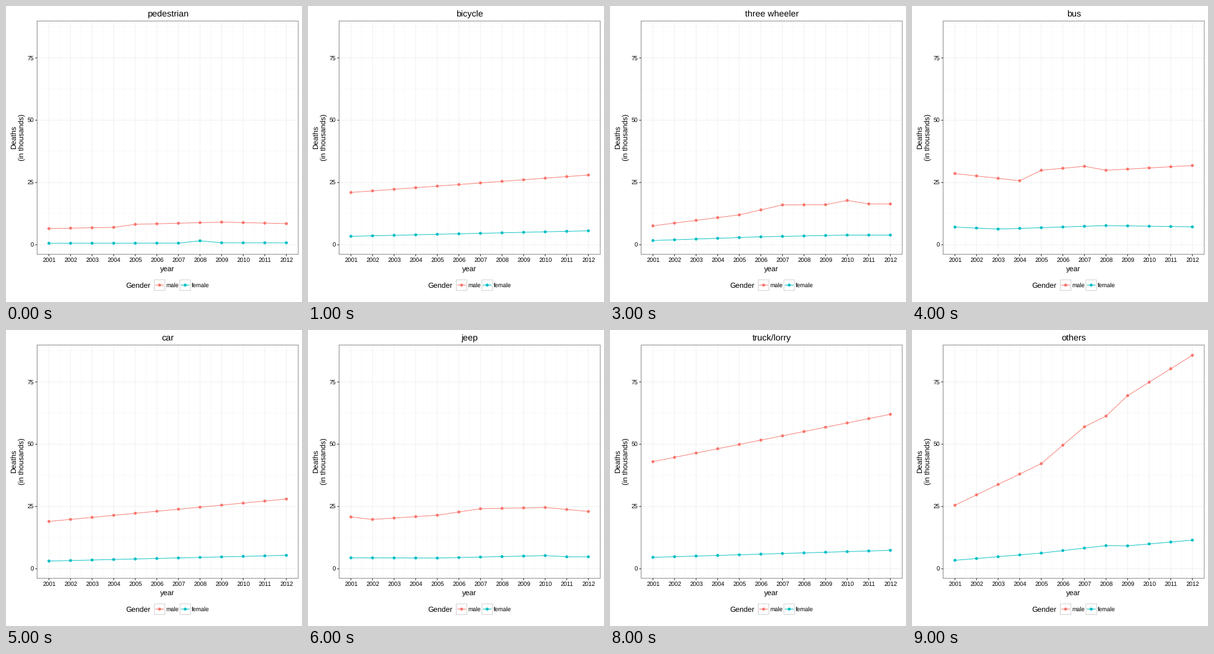
These frames come from a looping animation (480 by 480 pixels, 10 s). A matplotlib script:

```python
import numpy as np
import matplotlib.pyplot as plt
from matplotlib.animation import FuncAnimation
from matplotlib.patches import Circle, Rectangle

SIZE, DPI = 480, 80
PT = 72 / DPI  # points per pixel
MALE, FEMALE = "#F8766D", "#00BFC4"
LEFT, RIGHT, TOP, BOTTOM = 50.4, 474, 24.3, 402.7
YEARS = np.arange(2001, 2013)

plt.rcParams["font.family"] = "Liberation Sans"
plt.rcParams["text.hinting"] = "none"
plt.rcParams["path.snap"] = False

# Turning points of each slide: {year after 2000: deaths} for male, female.
SLIDES = {
    "pedestrian": ({1: 6.5, 4: 7, 5: 8.2, 9: 9.1, 12: 8.5},
                   {1: 0.6, 7: 0.65, 8: 1.6, 9: 0.8}),
    "bicycle": ({1: 21, 12: 28}, {1: 3.4, 12: 5.6}),
    "two wheeler": ({1: 16.7, 6: 22.4, 11: 30.8, 12: 27.25},
                    {1: 4.2, 6: 4.8, 12: 7.4}),
    "three wheeler": ({1: 7.6, 5: 12, 7: 16, 9: 16.1, 10: 17.8, 11: 16.4},
                      {1: 1.7, 6: 3.2, 10: 3.9}),
    "bus": ({1: 28.6, 4: 25.7, 5: 29.9, 7: 31.5, 8: 29.9, 12: 31.8},
            {1: 7.1, 3: 6.3, 8: 7.7, 12: 7.2}),
    "car": ({1: 19, 12: 28}, {1: 3.1, 12: 5.4}),
    "jeep": ({1: 20.8, 2: 19.8, 5: 21.5, 7: 24.1, 10: 24.6, 12: 23},
             {1: 4.4, 5: 4.3, 10: 5.3, 11: 4.8}),
    "tempo/vans": ({1: 14, 3: 13.5, 5: 16.1, 6: 13.8, 8: 15.6, 10: 21.2,
                    11: 21.3, 12: 19.7},
                   {1: 3, 9: 3.5, 10: 4.2}),
    "truck/lorry": ({1: 43, 12: 62}, {1: 4.6, 12: 7.4}),
    "others": ({1: 25.5, 5: 42.2, 7: 57, 8: 61.3, 9: 69.5, 12: 85.7},
               {1: 3.4, 5: 6.3, 8: 9.3, 9: 9.2, 12: 11.5}),
}
NAMES = list(SLIDES)


def px(year):
    return 69.65 + 35 * (year - 2001)


def py(value):
    return 387.2 - 4.04 * value


def heights(keys):
    return py(np.interp(YEARS - 2000, list(keys), list(keys.values())))


fig = plt.figure(figsize=(SIZE / DPI, SIZE / DPI), dpi=DPI, facecolor="white")
ax = fig.add_axes([0, 0, 1, 1])
ax.set_xlim(0, SIZE)
ax.set_ylim(SIZE, 0)
ax.axis("off")


def text(x, y, s, size, ha="center", va="baseline", **kw):
    return ax.text(x, y, s, fontsize=size * PT, ha=ha, va=va, color="black", **kw)


def line(xs, ys, color, width=1, z=2):
    return ax.plot(xs, ys, color=color, lw=width * PT, zorder=z,
                   solid_capstyle="butt")[0]


def dot(x, y, color):
    return ax.add_patch(Circle((x, y), 2.4, fc=color, lw=0, zorder=3))


def box(x, y, w, h, color):
    ax.add_patch(Rectangle((x, y), w, h, fill=False, ec=color, lw=0.9 * PT,
                           zorder=4))


def grid(values, years, color, z):
    for v in values:
        line([LEFT, RIGHT], [py(v)] * 2, color, z=z)
    for year in years:
        line([px(year)] * 2, [TOP, BOTTOM], color, z=z)


grid(np.arange(12.5, 90, 25), np.arange(2000.5, 2013), "#FAFAFA", 0)
grid(range(0, 80, 25), YEARS, "#F0F0F0", 1)
box(LEFT, TOP, RIGHT - LEFT, BOTTOM - TOP, "#7F7F7F")

for v in range(0, 80, 25):
    line([LEFT - 3, LEFT], [py(v)] * 2, "#222222", z=5)
    text(45.4, py(v) + 3.6, str(v), 9.6, ha="right")
for year in YEARS:
    line([px(year)] * 2, [BOTTOM, BOTTOM + 3], "#222222", z=5)
    text(px(year) + 0.4, 415.6, str(year), 9.6)

text(262, 429.6, "year", 12)
for x, label in ((18.4, "Deaths"), (32.4, "(in thousands)")):
    text(x, 212.6, label, 12, ha="right", va="center", rotation=90)

text(194.4, 457, "Gender", 12, ha="left")
for x, label, color in ((240.4, "male", MALE), (282, "female", FEMALE)):
    box(x, 444, 17.3, 17.3, "#CCCCCC")
    line([x + 1.7, x + 15.6], [452.6] * 2, color)
    dot(x + 8.65, 452.6, color)
    text(x + 19, 456, label, 9.6, ha="left")

title = text(262.2, 17, "", 14.4)
curves = [line(px(YEARS), px(YEARS), color, 0.9) for color in (MALE, FEMALE)]
dots = [[dot(px(year), 0, c.get_color()) for year in YEARS] for c in curves]


def update(i):
    name = NAMES[i]
    title.set_text(name)
    for curve, marks, keys in zip(curves, dots, SLIDES[name]):
        ys = heights(keys)
        curve.set_ydata(ys)
        for mark, year, y in zip(marks, YEARS, ys):
            mark.center = px(year), y
    return [title, *curves, *dots[0], *dots[1]]


anim = FuncAnimation(fig, update, frames=len(NAMES), interval=1000,
                     init_func=lambda: update(0), repeat=True, repeat_delay=0)
plt.show()
```
